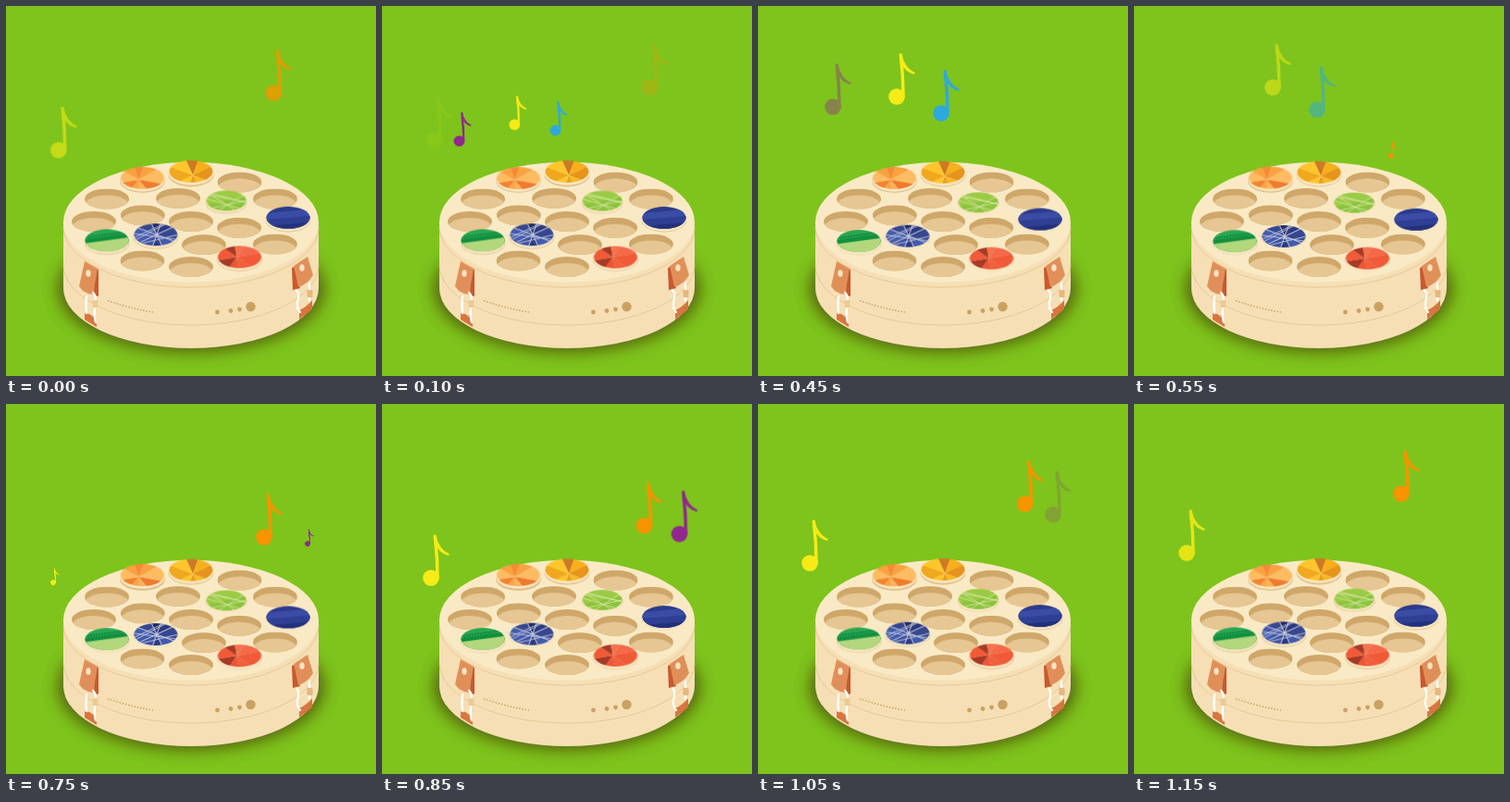
Animation, 400 px wide and 400 px high, one loop 1.2 s. Source, as an HTML page:

```html
<!DOCTYPE html>
<html lang="en">
<head>
<meta charset="utf-8">
<title>Music box</title>
<style>
  html, body { margin: 0; width: 100%; height: 100%; overflow: hidden; background: #7ec41c; }
  svg { display: block; width: 100%; height: 100%; }
  .note { transform-origin: 0 0; }
</style>
</head>
<body>
<svg viewBox="0 0 400 400">
  <defs>
    <filter id="soft" x="-20%" y="-30%" width="140%" height="160%"><feGaussianBlur stdDeviation="9"/></filter>
    <clipPath id="hole"><ellipse rx="24" ry="11"/></clipPath>
    <clipPath id="face"><ellipse rx="23.5" ry="12"/></clipPath>
    <g id="pit" clip-path="url(#hole)">
      <rect x="-24" y="-11" width="48" height="22" fill="#cfa76a"/>
      <ellipse cy="7" rx="24" ry="11" fill="#e6c692"/>
    </g>
    <g id="glyph" stroke-linecap="round" stroke-linejoin="round">
      <circle r="8.8" stroke="none"/>
      <path d="M7 0Q7-22 4.300-45" fill="none" stroke-width="3.500"/>
      <path d="M4.300-45C6-36 12-28 18.500-25.500C12-27 8-32 5.500-37Z" stroke-width="2.400"/>
    </g>
  </defs>

  <ellipse cx="200" cy="306" rx="143" ry="67" fill="#4a430c" opacity=".85" filter="url(#soft)"/>
  <path d="M62 233.700V305A138 65 0 0 0 338 305V233.700Z" fill="#f6dfb5"/>
  <g fill="none" stroke="#e2c28e" stroke-width=".8">
    <path d="M62 239A138 65 0 0 0 338 239"/>
    <path d="M62 280A138 65 0 0 0 338 280"/>
  </g>
  <ellipse cx="200" cy="233.700" rx="138" ry="65" fill="#f9eac5"/>

  <path d="M110 318.500Q134 327 159 331" fill="none" stroke="#c9a466" stroke-width="1.500" stroke-dasharray="1.500 1.800"/>
  <g fill="#c9a263">
    <circle cx="228.500" cy="331" r="2.400"/>
    <circle cx="243" cy="329.500" r="2.400"/>
    <circle cx="252.500" cy="328" r="2.400"/>
    <circle cx="264.500" cy="325" r="5.200"/>
  </g>

  <g stroke-linecap="round" stroke-linejoin="round">
    <path d="M96 283L100 285V314L95 312Z" fill="#c9572f"/>
    <path d="M85 276L99 284L94 312Q84 311 79 303Z" fill="#e18f58"/>
    <ellipse cx="89" cy="289" rx="2.700" ry="3.800" fill="#f8e3c4"/>
    <path d="M85 332Q92 332 98 340V347L85 339Z" fill="#d9753f"/>
    <path d="M87 314Q86 324 87 332M94 310Q98 312 96 326Q95 336 97 342" fill="none" stroke="#fff" stroke-width="2.300"/>
    <rect x="93.500" y="318" width="6" height="8" rx="1" fill="#eccb94"/>

    <path d="M309 283L314 281L318 305L310 307Z" fill="#c9572f"/>
    <path d="M311 281L326 271L332 291Q326 301 316 304Z" fill="#e18f58"/>
    <ellipse cx="320" cy="283" rx="2.700" ry="3.800" fill="#f8e3c4"/>
    <path d="M317 329Q324 326 331 318V328L317 339Z" fill="#d9753f"/>
    <path d="M314 307Q318 311 315 320Q314 327 318 331M328 300V319" fill="none" stroke="#fff" stroke-width="2.300"/>
    <rect x="325.500" y="307" width="6" height="8" rx="1" fill="#e3b87e"/>
  </g>

  <g id="holes"></g>
  <g id="discs"></g>
  <g id="notes"></g>
</svg>
<script>
const LOOP = 1200, STEP = 50, COUNT = LOOP / STEP;
const byId = id => document.getElementById(id);
const clamp = v => Math.min(1, Math.max(0, v));
const polar = (deg, rx, ry) => [rx * Math.cos(deg * Math.PI / 180), ry * Math.sin(deg * Math.PI / 180)];

function add(parent, tag, attrs) {
  const el = document.createElementNS('http://www.w3.org/2000/svg', tag);
  for (const k in attrs) el.setAttribute(k, attrs[k]);
  parent.appendChild(el);
  return el;
}

function play(el, pose) {
  const frames = [];
  for (let i = 0; i <= COUNT; i++) {
    frames.push({ offset: i / COUNT, easing: 'steps(1, end)', ...pose(i % COUNT * STEP) });
  }
  el.animate(frames, { duration: LOOP, iterations: Infinity });
}

// Disc patterns
function fan(g, colors, fx, fy, start, edge = 'none') {
  const turn = 360 / colors.length;
  colors.forEach((fill, i) => {
    const a = polar(start + i * turn, 60, 60), b = polar(start + (i + 1) * turn + .5, 60, 60);
    add(g, 'path', { d: `M${fx} ${fy}l${a}L${fx + b[0]} ${fy + b[1]}Z`, fill, stroke: edge, 'stroke-width': .8 });
  });
}

function bands(g, colors, tilt) {
  const h = 28 / colors.length;
  colors.forEach((fill, i) => add(g, 'rect', {
    x: -30, y: -14 + i * h, width: 60, height: h + 14, fill, transform: `rotate(${tilt})` }));
}

function chords(g, count, seed, stroke) {
  const random = () => (seed = seed * 16807 % 2147483647) / 2147483647;
  for (let i = 0; i < count; i++) {
    const deg = random() * 360;
    add(g, 'path', { d: `M${polar(deg, 24, 12)}L${polar(deg + 120 + random() * 100, 24, 12)}`, stroke, 'stroke-width': .8 });
  }
}

// Slots lie on two rings round the middle one.
const outer = deg => polar(deg, 105, 49), inner = deg => polar(deg, 54, 26);
const slots = [[0, 0]];
for (let i = 0; i < 12; i++) slots.push(outer(i * 30));
for (let i = 0; i < 6; i++) slots.push(inner(15 + i * 60));

// sink: how far a disc moves down when the loop reaches its peak time
const discs = [
  { at: outer(240), peak: 850, sink: -1.5, paint: g =>
      fan(g, ['#f9a23f', '#fdbb62', '#f07a2e', '#fcb45a', '#fba447', '#f3832f', '#fdbb62', '#f9a23f', '#f58b35'], -4, 2, -70) },
  { at: outer(270), peak: 1150, sink: -1, paint: g =>
      fan(g, ['#cc7b24', '#f7b01b', '#e6941b', '#f9b825', '#e9a01f', '#ffc62c', '#f0a81e', '#ffc62c'], 2, 4, -115) },
  { at: inner(315), peak: 600, sink: 2.5, size: .91, paint: g => {
      bands(g, ['#9bcb45', '#8cc43c'], -12);
      chords(g, 6, 77, '#dcebac');
    } },
  { at: outer(0), peak: 600, sink: 2, paint: g => bands(g, ['#2b3a8c', '#3a4ca3', '#2e3f94', '#23317a'], -5) },
  { at: outer(150), peak: 650, sink: 1, paint: g => {
      bands(g, ['#27a652', '#12903f', '#b2d77c', '#b2d77c'], -8);
      add(g, 'path', { d: 'M-22-2L22-8', stroke: '#5fc486', 'stroke-dasharray': '1 2' });
    } },
  { at: inner(135), peak: 650, sink: 2, paint: g => {
      fan(g, ['#435bad', '#2c3a80', '#3c4f9f', '#435bad', '#364790', '#222c68', '#2c3a80', '#364790'], 1, 0, 20, '#d5d9e8');
      chords(g, 4, 31, '#d5d9e8');
    } },
  { at: outer(60), peak: 500, sink: 1.5, paint: g =>
      fan(g, ['#a63a25', '#f15a38', '#a63a25', '#f4724c', '#f4694a', '#f15a38', '#f0603c', '#ee5535'], -3, 0, 125) }
];

for (const [x, y] of slots) {
  const taken = discs.some(d => Math.hypot(d.at[0] - x, d.at[1] - y) < 1);
  if (!taken) add(byId('holes'), 'use', { href: '#pit', x: 200 + x, y: 233 + y });
}

for (const d of discs) {
  const spot = add(byId('discs'), 'g', {
    transform: `translate(${200 + d.at[0]} ${228.8 + d.at[1]}) scale(${d.size || 1})` });
  add(spot, 'ellipse', { cy: 3.2, rx: 24.3, ry: 12.2, fill: '#dfbd87' });
  const g = add(spot, 'g', {});
  add(g, 'ellipse', { cy: 2.6, rx: 23.9, ry: 12.2, fill: '#f8e7c3' });
  d.paint(add(g, 'g', { 'clip-path': 'url(#face)' }));
  play(g, t => {
    const dy = d.sink * (1 + Math.cos((t - d.peak) / LOOP * 2 * Math.PI)) / 2;
    return { transform: `translateY(${dy.toFixed(2)}px)` };
  });
}

// A note passes one point of its path every 200 ms; it grows at first and fades from time `fade`.
const LEG = 200, GROW = 150, FADE = 200, LEAD = 50;
const yellow = '#f6eb16', orange = '#f79400', purple = '#92278f', blue = '#2fa9db';
const notes = [
  { color: yellow, born: 700, fade: 1120, path: [[51, 193], [55, 183], [57, 161], [56, 140]] },
  { color: orange, born: 500, fade: 1155, path: [[278, 162], [279, 144], [288, 119], [289, 97], [290, 85]] },
  { color: purple, born: 0, fade: 330, path: [[84, 150], [82, 134], [81, 109], [81, 90]] },
  { color: yellow, born: 0, fade: 455, path: [[143, 134], [144, 111], [150, 98], [150, 78]] },
  { color: blue, born: 0, fade: 455, path: [[187, 138], [189, 124], [198, 116], [198, 108]] },
  { color: purple, born: 700, fade: 890, path: [[326, 151], [317, 130], [321, 109]] }
];

function pointAt(path, age) {
  const u = clamp((age - LEAD) / LEG / (path.length - 1)) * (path.length - 1);
  const i = Math.min(Math.floor(u), path.length - 2);
  return path[i].map((v, j) => v + (path[i + 1][j] - v) * (u - i));
}

for (const n of notes) {
  const el = add(byId('notes'), 'use', { href: '#glyph', class: 'note', fill: n.color, stroke: n.color });
  play(el, t => {
    const age = (t - n.born + LOOP) % LOOP;
    const [x, y] = pointAt(n.path, age);
    return {
      transform: `translate(${x}px, ${y}px) scale(${clamp(age / GROW)})`,
      opacity: 1 - clamp((age + n.born - n.fade) / FADE)
    };
  });
}
</script>
</body>
</html>
```
